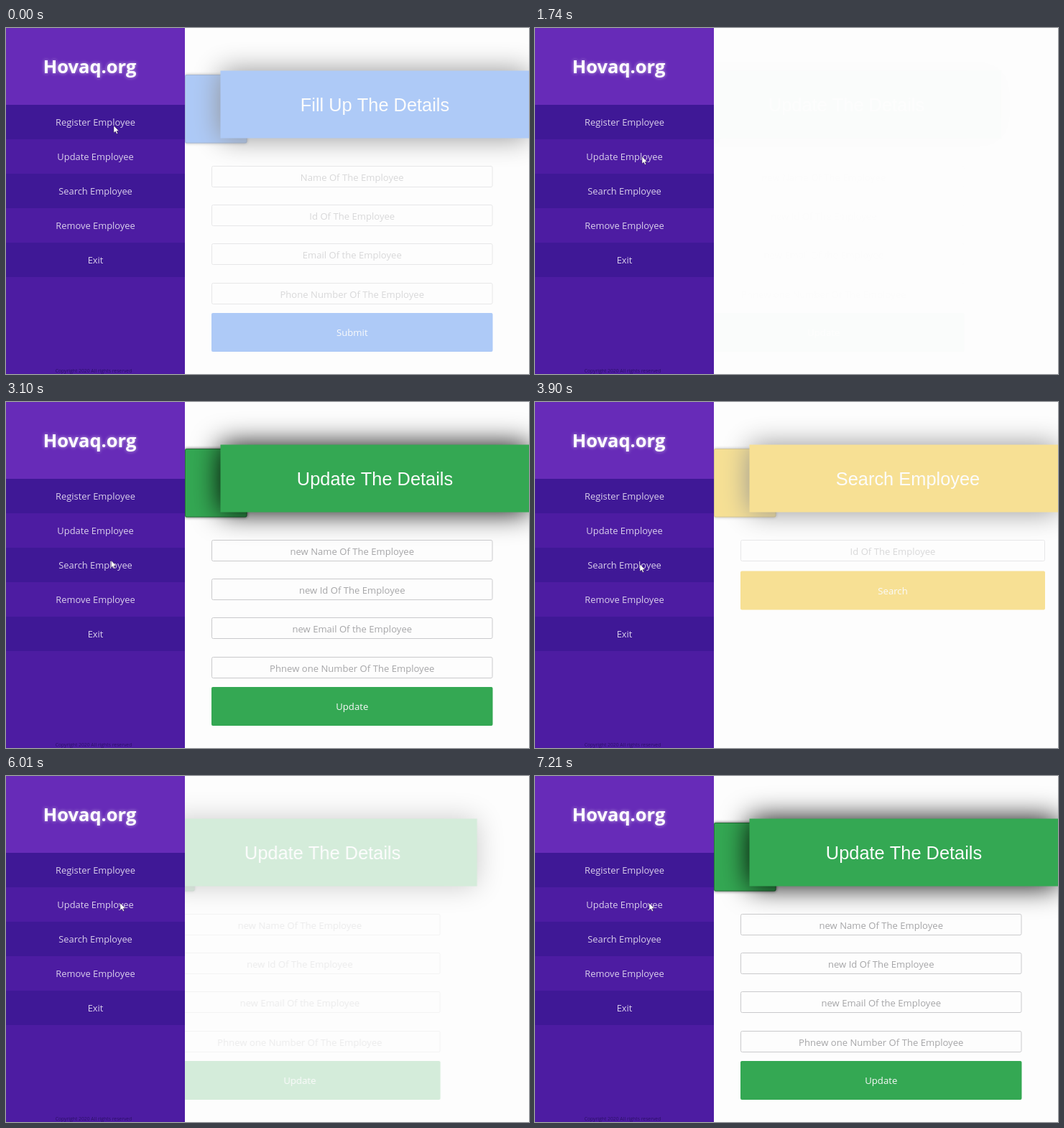
An HTML page with a canvas that plays this animation: 728 by 482 pixels, repeating every 7250 ms.

```html
<!DOCTYPE html>
<html lang="en">
<head>
<meta charset="utf-8">
<title>Employee desk</title>
<style>
  html, body { margin: 0; width: 100%; height: 100%; overflow: hidden; background: #fdfdfd; }
  canvas { display: block; }
</style>
</head>
<body>
<canvas id="stage" width="728" height="482"></canvas>
<script>
const W = 728, H = 482, LOOP = 7250, SIDEBAR = 249;
const UI = '"Open Sans", "Noto Sans", sans-serif';
const HEAD = '"Liberation Sans", Arial, sans-serif';
const stage = document.getElementById('stage').getContext('2d');

const clamp = v => Math.min(1, Math.max(0, v));
const easeOut = v => 1 - (1 - v) ** 2;
const smooth = v => v * v * (3 - 2 * v);

// Short acceleration and braking around an even glide.
function easeBoth(v) {
  if (v < 0.2) return 3.125 * v * v;
  if (v > 0.8) return 1 - 3.125 * (1 - v) ** 2;
  return 1.25 * v - 0.125;
}

function text(c, str, x, y, font, color) {
  c.font = font;
  c.fillStyle = color;
  c.textAlign = 'center';
  c.textBaseline = 'alphabetic';
  c.fillText(str, x, y);
}

function box(c, x, y, w, h, color, radius = 0) {
  c.fillStyle = color;
  c.beginPath();
  c.roundRect(x, y, w, h, radius);
  c.fill();
}

function outline(c, x, y, w, h, color, radius = 0) {
  c.strokeStyle = color;
  c.lineWidth = 1;
  c.beginPath();
  c.roundRect(x, y, w, h, radius);
  c.stroke();
}

function glow(c, color, blur, draw) {
  c.save();
  c.shadowColor = color;
  c.shadowBlur = blur;
  draw();
  c.restore();
}

function makeCanvas() {
  const canvas = document.createElement('canvas');
  canvas.width = W + 100;
  canvas.height = H;
  return canvas;
}

function makePanel({ color, title, titleX = 513.5, fields, action, width }) {
  const canvas = makeCanvas(), c = canvas.getContext('2d');
  const middle = 286 + width / 2;

  glow(c, 'rgba(0,0,0,.7)', 4, () => box(c, 249, 65, 86.5, 95.5, color, 2));
  outline(c, 249.5, 65.5, 85.5, 94.5, 'rgba(0,0,0,.3)', 2);
  glow(c, '#000', 38, () => box(c, 298.5, 59.5, 430, 94, color));
  text(c, title, titleX, 115.5, '25.4px ' + HEAD, '#fcfcfc');

  fields.forEach((label, i) => {
    const y = Math.floor(192.5 + i * 54.2);
    outline(c, 286.5, y + 0.5, width - 1, 29, '#cacacc', 2);
    text(c, label, middle, y + 20.5, '13.1px ' + UI, '#a6a6a8');
  });

  const top = fields.length > 1 ? 397 : 235.5;
  box(c, 286, top, width, 54, color, 2);
  text(c, action, middle, top + 32, '13.2px ' + UI, '#f8f8f8');
  return canvas;
}

const panels = {
  register: makePanel({
    color: '#4285f0', title: 'Fill Up The Details', action: 'Submit', width: 391.5,
    fields: ['Name Of The Employee', 'Id Of The Employee',
      'Email Of the Employee', 'Phone Number Of The Employee']
  }),
  update: makePanel({
    color: '#34a853', title: 'Update The Details', action: 'Update', width: 391.5,
    fields: ['new Name Of The Employee', 'new Id Of The Employee',
      'new Email Of the Employee', 'Phnew one Number Of The Employee']
  }),
  search: makePanel({
    color: '#efba06', title: 'Search Employee', titleX: 519, action: 'Search', width: 424,
    fields: ['Id Of The Employee']
  })
};

const scenes = [
  { panel: 'register', from: -160, to: 1230 },
  { panel: 'update', from: 1735, to: 3165, slides: true },
  { panel: 'search', from: 3740, to: 5410 },
  { panel: 'update', from: 5905, to: LOOP, slides: true }
];

const spots = [[150, 136], [149, 179], [146, 226], [159, 177]];
const moves = [[970, 1230], [2850, 3165], [4600, 5170]];

function drawPanel(t) {
  const scene = scenes.find(s => t >= s.from && t < s.to);
  if (!scene) return;
  const age = t - scene.from;
  const shift = scene.slides ? -80 * (1 - easeBoth(clamp(age / 620))) : 0;
  stage.globalAlpha = easeOut(clamp(age / (scene.slides ? 1000 : 670)));
  stage.drawImage(panels[scene.panel], shift, 0);
  stage.globalAlpha = 1;
}

function drawSidebar() {
  box(stage, 0, 0, SIDEBAR, H, '#4d1ca2');
  box(stage, 0, 0, SIDEBAR, 107, '#672bb8');
  glow(stage, 'rgba(255,255,255,.6)', 5, () =>
    text(stage, 'Hovaq.org', 116.5, 63, 'bold 25.5px ' + UI, '#ffffff'));
  ['Register Employee', 'Update Employee', 'Search Employee', 'Remove Employee', 'Exit']
    .forEach((label, i) => {
      const y = 107 + i * 48.1;
      if (i % 2 === 0) box(stage, 0, Math.round(y), SIDEBAR, 48, '#3f1896');
      text(stage, label, 124.5, y + 29, '12.9px ' + UI, '#d9cfeb');
    });
  text(stage, 'Copyright 2020 All rights reserved', 122, 480, '6.8px ' + UI, '#2c1068');
}

function drawCursor(t) {
  let [x, y] = spots[0];
  moves.forEach(([from, to], i) => {
    const p = smooth(clamp((t - from) / (to - from)));
    x += (spots[i + 1][0] - spots[i][0]) * p;
    y += (spots[i + 1][1] - spots[i][1]) * p;
  });
  stage.save();
  stage.translate(x, y);
  stage.beginPath();
  [[0, 0], [0, 10], [2.3, 8], [4, 11.5], [5.6, 10.8], [4, 7.4], [7, 7.2]]
    .forEach(p => stage.lineTo(...p));
  stage.closePath();
  stage.fillStyle = '#ffffff';
  stage.fill();
  stage.strokeStyle = 'rgba(30,10,50,.7)';
  stage.lineWidth = 0.6;
  stage.stroke();
  stage.restore();
}

function render(now) {
  const t = now % LOOP;
  box(stage, 0, 0, W, H, '#fdfdfd');
  drawPanel(t);
  drawSidebar();
  drawCursor(t);
}

let start;
function tick(now) {
  start ??= now;
  render(now - start);
  requestAnimationFrame(tick);
}
render(0);
requestAnimationFrame(tick);
</script>
</body>
</html>
```
